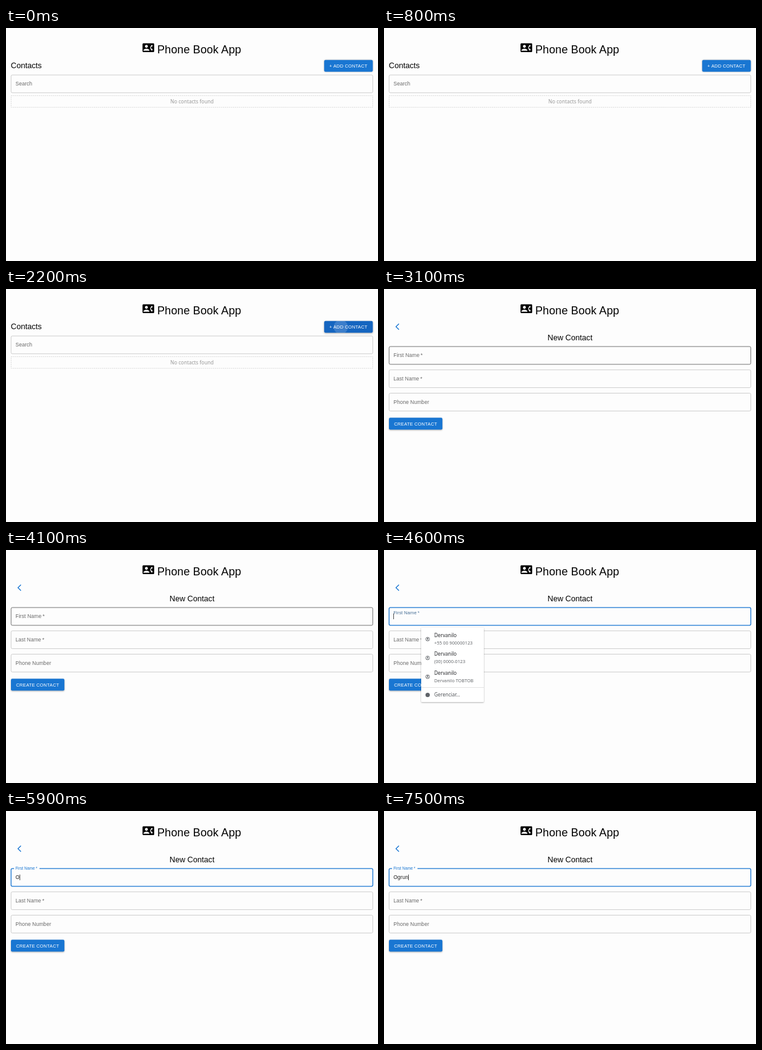
Animation, 600 px wide and 377 px high, one loop 8 s. Source, as an HTML page:

```html
<!DOCTYPE html>
<html lang="en">
<head>
<meta charset="utf-8">
<title>Phone Book App</title>
<style>
  html, body { margin: 0; width: 100%; height: 100%; overflow: hidden; background: #fdfdfd; }
  svg { display: block; width: 100vw; height: 100vh; font-family: "Liberation Sans", Arial, sans-serif; }
  text { white-space: pre; }
  .title { font-size: 17.93px; letter-spacing: .0073em; }
  .heading { font-size: 12.65px; }
  .body { font-size: 8.43px; letter-spacing: .0094em; }
  .label { fill: #6b6b6b; }
  .button { font-size: 7.38px; letter-spacing: .0286em; fill: #fff; }
  .field { fill: none; stroke: #c9c9c9; stroke-width: .9; }
  .system { font-family: "Noto Sans", "Open Sans", sans-serif; }
  .name { font-size: 8px; fill: #28292c; }
  .detail { font-size: 7.27px; fill: #66696d; }
  .raised { filter: drop-shadow(0 1px .8px rgba(0,0,0,.3)); }
  #menu { filter: drop-shadow(0 1px 1px rgba(0,0,0,.3)); }
</style>
</head>
<body>
<svg viewBox="0 0 600 377">
  <defs>
    <clipPath id="buttonClip"><rect x="513.2" y="51.8" width="78.4" height="19" rx="2.1"/></clipPath>
  </defs>

  <path transform="translate(220.2 22.5) scale(.785)" fill-rule="evenodd" d="M22 3H2C.9 3 0 3.9 0 5v14c0 1.1.9 2 2 2h20c1.1 0 2-.9 2-2V5c0-1.1-.9-2-2-2zM8 6c1.66 0 3 1.34 3 3s-1.34 3-3 3-3-1.34-3-3 1.34-3 3-3zm6 12H2v-1c0-2 4-3.1 6-3.1s6 1.1 6 3.1zm3.85-4h1.64L21 16l-2 2c-1.3-1-2.27-2.4-2.72-4a7.4 7.4 0 0 1 0-4c.45-1.6 1.42-3 2.72-4L21 8l-1.5 2h-1.65a6 6 0 0 0 0 4z"/>
  <text class="title" x="244" y="41.3">Phone Book App</text>

  <g id="list">
    <text class="heading" x="7.8" y="65.3">Contacts</text>
    <rect id="addButton" x="513.2" y="51.8" width="78.4" height="19" rx="2.1"/>
    <g clip-path="url(#buttonClip)"><circle id="ripple" cx="540" cy="61.5" fill="#fff"/></g>
    <text class="button" x="521.6" y="64">+ ADD CONTACT</text>
    <rect class="field" x="8.2" y="76" width="583.4" height="28.8" rx="2.1"/>
    <text class="body label" x="15.2" y="93.2">Search</text>
    <rect x="8.3" y="109.5" width="583.2" height="18.8" fill="none" stroke="#d2d2d2" stroke-width=".8" stroke-dasharray="2 1.2"/>
    <text class="system" x="300" y="122" text-anchor="middle" font-size="8.1" fill="#999">No contacts found</text>
  </g>

  <g id="form">
    <path transform="translate(15.2 54.7) scale(.527)" fill="#1976d2" d="M17.77 3.77 16 2 6 12l10 10 1.77-1.77L9.54 12z"/>
    <text class="heading" x="300" y="83.1" text-anchor="middle">New Contact</text>
    <rect class="field" id="firstField" x="8.2" y="93.1" width="583.4" height="28.8" rx="2.1"/>
    <rect id="notch" x="13" y="91.5" height="3.2" fill="#fdfdfd"/>
    <text class="body" id="firstLabel">First Name&#8201;*</text>
    <text class="body" id="typed" x="15.2" y="110.4" fill="#222"></text>
    <rect id="caret" y="102.8" width=".8" height="9.2" fill="#222"/>
    <rect class="field" x="8.2" y="130.8" width="583.4" height="28.8" rx="2.1"/>
    <text class="body label" x="15.2" y="148.1">Last Name&#8201;*</text>
    <rect class="field" x="8.2" y="168.6" width="583.4" height="28.8" rx="2.1"/>
    <text class="body label" x="15.2" y="185.9">Phone Number</text>
    <rect class="raised" x="8" y="208.3" width="86.2" height="19.2" rx="2.1" fill="#1976d2"/>
    <text class="button" x="16.2" y="220.6">CREATE CONTACT</text>
    <g id="menu">
      <rect x="60" y="125.5" width="101" height="120.5" rx="1" fill="#fff"/>
      <g id="entries"></g>
      <path d="M60 222.5H161" stroke="#dcdcdc" stroke-width=".8"/>
      <circle cx="70.4" cy="234.5" r="3.5" fill="#5f6368"/>
      <text class="system name" x="81" y="237.3" style="fill:#55585c">Gerenciar…</text>
    </g>
  </g>
</svg>
<script>
const LOOP = 8000, STEP = 100;
const FORM_AT = 2300, HOVER_AT = 3100, FOCUS_AT = 4600;
const el = id => document.getElementById(id);
const set = (id, attrs) => { for (const key in attrs) el(id).setAttribute(key, attrs[key]); };
const show = (id, on) => { el(id).style.display = on ? '' : 'none'; };
const clamp = v => Math.max(0, Math.min(1, v));
const mix = (a, b, p) => a + (b - a) * p;
const blend = (a, b, p) => `rgb(${a.map((v, i) => Math.round(mix(v, b[i], p)))})`;
const smooth = p => p * p * (3 - 2 * p);
// Last value whose start time has passed
const at = (steps, t) => steps.reduce((value, [start, next]) => t >= start ? next : value, steps[0][1]);

const TYPING = [[0, ''], [5600, 'O'], [6500, 'Og'], [6800, 'Ogr'], [7100, 'Ogru'], [7500, 'Ogrun']];
const FLOAT = [[0, 0], [4600, .43], [4700, .95], [4800, 1]];
const NOTCH = [[0, 0], [4700, 22], [4800, 41]];
const MENU = [[0, 0], [4600, 1], [5600, .64], [5700, .32], [5800, .1], [5900, 0]];
const CARET = [[0, 0], [4600, 1], [5200, 0], [5600, 1]];

el('entries').innerHTML = ['+55 00 900000123', '(00) 0000-0123', 'Dervanilo TOBTOB'].map((detail, i) =>
  `<g transform="translate(0 ${i * 30.4})">
    <g fill="none" stroke="#5f6368" stroke-width=".8"><circle cx="70.4" cy="144.2" r="3.1"/><path d="M68.2 146.2q2.2-1.7 4.4 0"/></g>
    <circle cx="70.4" cy="143.2" r="1.2" fill="#5f6368"/>
    <text class="system name" x="81" y="140.8">Dervanilo</text>
    <text class="system detail" x="81" y="153">${detail}</text>
  </g>`).join('');

function drawList(t) {
  const hover = smooth(clamp((t - 1600) / 250));
  const press = smooth(clamp((t - 2080) / 550));
  const depth = hover + clamp((t - 2050) / 150) * .4;
  el('addButton').style.filter = `drop-shadow(0 ${mix(.8, 1.3, depth)}px ${mix(.8, 1.4, depth)}px rgba(0,0,0,.32))`;
  set('addButton', { fill: blend([25, 118, 210], [21, 101, 192], hover) });
  set('ripple', { r: press * 94, opacity: .14 + press * .2 });
}

function drawForm(t) {
  const focused = t >= FOCUS_AT;
  const float = at(FLOAT, t);
  el('firstField').style.stroke = focused ? '#1976d2' : t >= HOVER_AT ? '#666' : '';
  el('firstField').style.strokeWidth = focused ? 1.3 : '';
  set('notch', { width: at(NOTCH, t) });
  set('firstLabel', {
    transform: `translate(15.2 ${mix(110.4, 94.7, float)}) scale(${mix(1, .75, float)})`,
    fill: blend([107, 107, 107], [25, 118, 210], float)
  });
  const word = el('typed');
  word.textContent = at(TYPING, t);
  const end = word.textContent ? word.getComputedTextLength() : 0;
  set('caret', { x: 15.2 + end, opacity: at(CARET, t) });

  const opacity = at(MENU, t);
  const scale = mix(.96, 1, opacity);
  show('menu', opacity > 0);
  set('menu', { opacity, transform: `translate(110.5 186) scale(${scale}) translate(-110.5 -186)` });
}

function draw(now) {
  const t = Math.floor(now % LOOP / STEP) * STEP;
  const onForm = t >= FORM_AT;
  show('list', !onForm);
  show('form', onForm);
  onForm ? drawForm(t) : drawList(t);
}

const start = performance.now();
function tick() {
  draw(performance.now() - start);
  requestAnimationFrame(tick);
}
tick();
</script>
</body>
</html>
```
